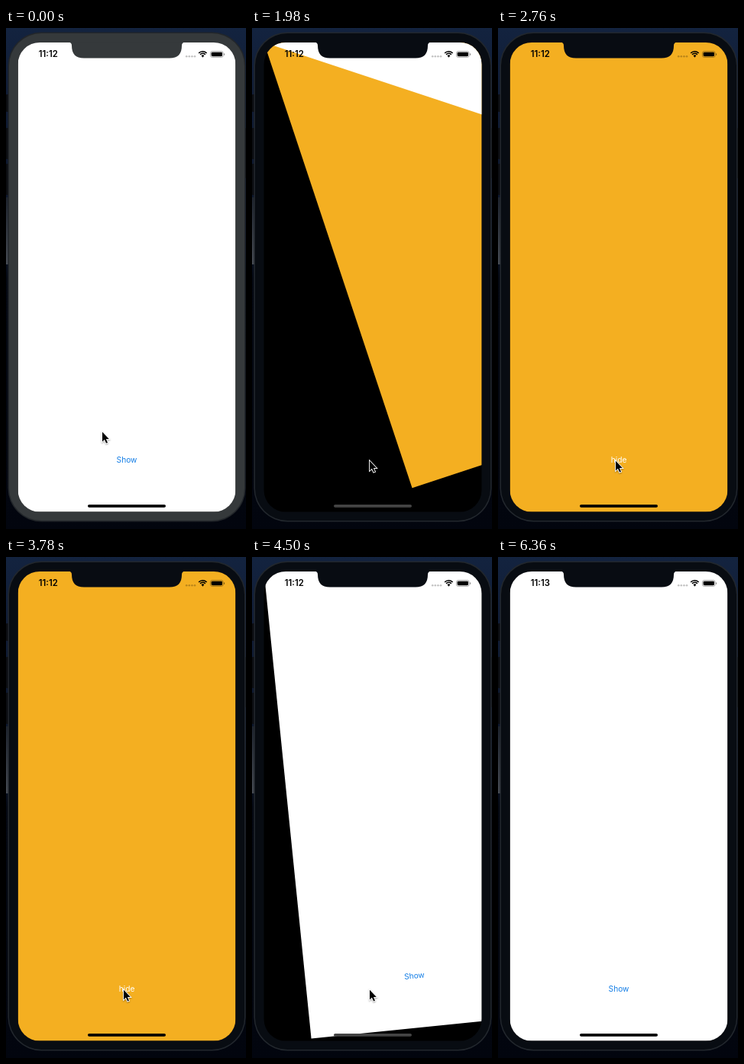
Recreate the animation shown at these times as an HTML page with a canvas. Size 314 px wide and 657 px high, loop 6960 ms.

```html
<!DOCTYPE html>
<html lang="en">
<head>
<meta charset="utf-8">
<title>Rotating screen transition</title>
<style>
  html, body { margin: 0; width: 100%; height: 100%; overflow: hidden; background: #03060f; }
  canvas { display: block; width: 314px; height: 657px; }
</style>
</head>
<body>
<canvas id="stage"></canvas>
<script>
const W = 314, H = 657, LOOP = 6960, STEP = 60;
const SCREEN = { x: 15.6, y: 18.9, w: 284.8, h: 615.7, r: 28.5 };
const BUTTON = { x: 142.4, y: 547.1 };
const ORANGE = '#f4af21';
const PRESENT = 1883.8, DISMISS = 4237.6, SPRING_TIME = 700;

const canvas = document.getElementById('stage');
const ctx = canvas.getContext('2d');
const ratio = window.devicePixelRatio || 1;
canvas.width = W * ratio;
canvas.height = H * ratio;

const clamp = v => Math.max(0, Math.min(1, v));
const ease = v => v * v * (3 - 2 * v);

// Underdamped spring from 0 to 1, damping ratio about 0.5.
function spring(ms) {
  const s = ms / 1000, a = 16.9 * s;
  return 1 - Math.exp(-9.75 * s) * (Math.cos(a) + 0.577 * Math.sin(a));
}

function box(x, y, w, h, r, fill) {
  ctx.beginPath();
  ctx.roundRect(x, y, w, h, r);
  if (fill) {
    ctx.fillStyle = fill;
    ctx.fill();
  }
}

function label(text, x, y, font, color) {
  ctx.font = font;
  ctx.fillStyle = color;
  ctx.textAlign = 'center';
  ctx.textBaseline = 'alphabetic';
  ctx.fillText(text, x, y);
}

function drawDesktop() {
  const sky = ctx.createLinearGradient(0, 0, 0, H);
  sky.addColorStop(0, '#13233f');
  sky.addColorStop(0.15, '#101c35');
  sky.addColorStop(0.45, '#0a1326');
  sky.addColorStop(0.5, '#040812');
  sky.addColorStop(1, '#02050e');
  ctx.fillStyle = sky;
  ctx.fillRect(0, 0, W, H);
  const side = ctx.createLinearGradient(0, 222, 0, 310);
  side.addColorStop(0, '#1d232d');
  side.addColorStop(1, '#454a52');
  ctx.fillStyle = side;
  ctx.fillRect(0, 222, 4, 88);
}

function drawPhone(active) {
  for (const [y, h] of [[87, 23], [131, 41], [178, 41]]) box(0, y, 4, h, 1, '#0b0d11');
  box(311, 131, 3, 66, 1, '#0b0d11');
  box(2.5, 5.5, 311, 642, 44, active ? '#22272d' : '#22262a');
  box(4, 7, 308, 639, 42.5, active ? '#080c12' : '#35393b');
}

function drawNotch(active) {
  ctx.beginPath();
  ctx.moveTo(82, 18.5);
  ctx.quadraticCurveTo(86, 19, 86, 23);
  ctx.bezierCurveTo(86, 34, 91, 39.5, 102, 39.5);
  ctx.lineTo(214, 39.5);
  ctx.bezierCurveTo(225, 39.5, 230, 34, 230, 23);
  ctx.quadraticCurveTo(230, 19, 234, 18.5);
  ctx.closePath();
  ctx.fillStyle = active ? '#080c12' : '#35393b';
  ctx.fill();
}

function drawView(view, angle) {
  ctx.save();
  ctx.translate(SCREEN.x, SCREEN.y);
  ctx.rotate(angle * Math.PI / 180);
  ctx.fillStyle = view.fill;
  ctx.fillRect(0, 0, SCREEN.w, SCREEN.h);
  ctx.globalAlpha = view.alpha;
  label(view.text, BUTTON.x, BUTTON.y + 3.8, '400 10.2px Inter, sans-serif', view.color);
  ctx.restore();
}

// A press dims the button, which then fades back.
function pressAlpha(t, start) {
  if (t < start || t > start + 540) return 1;
  return 0.25 + 0.75 * clamp((t - start) / 540);
}

function drawScreen(t) {
  const show = { fill: '#fff', text: 'Show', color: '#147ee6', alpha: pressAlpha(t, 960) };
  const hide = { fill: ORANGE, text: 'hide', color: '#fff', alpha: pressAlpha(t, 3240) };
  const presenting = t < (PRESENT + DISMISS) / 2;
  const elapsed = t - (presenting ? PRESENT : DISMISS);
  const [from, to] = presenting ? [show, hide] : [hide, show];
  const turn = presenting ? -90 : 90;

  ctx.fillStyle = '#000';
  ctx.fillRect(SCREEN.x - 1, SCREEN.y - 1, SCREEN.w + 2, SCREEN.h + 2);
  let bar = '#000';
  if (elapsed <= 0) {
    drawView(from, 0);
  } else if (elapsed >= SPRING_TIME) {
    drawView(to, 0);
  } else {
    const p = spring(elapsed);
    drawView(to, turn * (1 - p));
    drawView(from, turn * p);
    const shade = Math.round(68 * clamp(Math.abs(1 - p) * 16));
    bar = `rgb(${shade},${shade},${shade})`;
  }
  box(107, 624.9, 102, 3.8, 1.9, bar);
}

function drawStatus(t) {
  label(t < 6240 ? '11:12' : '11:13', 55.3, 38.4, '600 11.3px Inter, sans-serif', '#000');

  ctx.fillStyle = 'rgba(0,0,0,.24)';
  for (let i = 0; i < 4; i++) {
    ctx.beginPath();
    ctx.arc(236.2 + i * 3.6, 37.3, 1.3, 0, 7);
    ctx.fill();
  }

  ctx.strokeStyle = ctx.fillStyle = '#000';
  ctx.lineWidth = 1.6;
  for (const r of [7.2, 4.6]) {
    ctx.beginPath();
    ctx.arc(257.4, 38, r, -Math.PI * 0.76, -Math.PI * 0.24);
    ctx.stroke();
  }
  ctx.beginPath();
  ctx.moveTo(257.4, 38.8);
  ctx.arc(257.4, 38, 2.6, -Math.PI * 0.76, -Math.PI * 0.24);
  ctx.fill();

  box(267.4, 30.6, 16.8, 7.8, 2.4);
  ctx.strokeStyle = 'rgba(0,0,0,.4)';
  ctx.lineWidth = 0.8;
  ctx.stroke();
  box(268.6, 31.8, 14.4, 5.4, 1.4, '#000');
  box(285, 33.2, 1.1, 2.6, 0.6, 'rgba(0,0,0,.45)');
}

function drawCursor(t) {
  if (t >= 5820) return;
  const p = ease(clamp(t / 420));
  ctx.save();
  ctx.globalAlpha = t >= 5760 ? 0.5 : 1;
  ctx.translate(126 + 28 * p, 529.8 + 38 * p);
  ctx.beginPath();
  ctx.moveTo(0, 0);
  for (const [x, y] of [[0, 12.7], [2.9, 10], [5.1, 14.8], [7, 14], [4.9, 9.3], [8.8, 9.3]]) ctx.lineTo(x, y);
  ctx.closePath();
  ctx.shadowColor = 'rgba(0,0,0,.35)';
  ctx.shadowBlur = 2 * ratio;
  ctx.shadowOffsetY = ratio;
  ctx.strokeStyle = '#fff';
  ctx.lineWidth = 1.8;
  ctx.stroke();
  ctx.shadowColor = 'transparent';
  ctx.fillStyle = '#000';
  ctx.fill();
  ctx.restore();
}

function draw(t) {
  const active = t >= 840;
  ctx.setTransform(ratio, 0, 0, ratio, 0, 0);
  drawDesktop();
  drawPhone(active);
  ctx.save();
  box(SCREEN.x, SCREEN.y, SCREEN.w, SCREEN.h, SCREEN.r);
  ctx.clip();
  drawScreen(t);
  drawStatus(t);
  ctx.restore();
  drawNotch(active);
  drawCursor(t);
}

const began = performance.now();
function tick() {
  const t = (performance.now() - began) % LOOP;
  draw(Math.floor(t / STEP) * STEP);
  requestAnimationFrame(tick);
}
tick();
</script>
</body>
</html>
```
